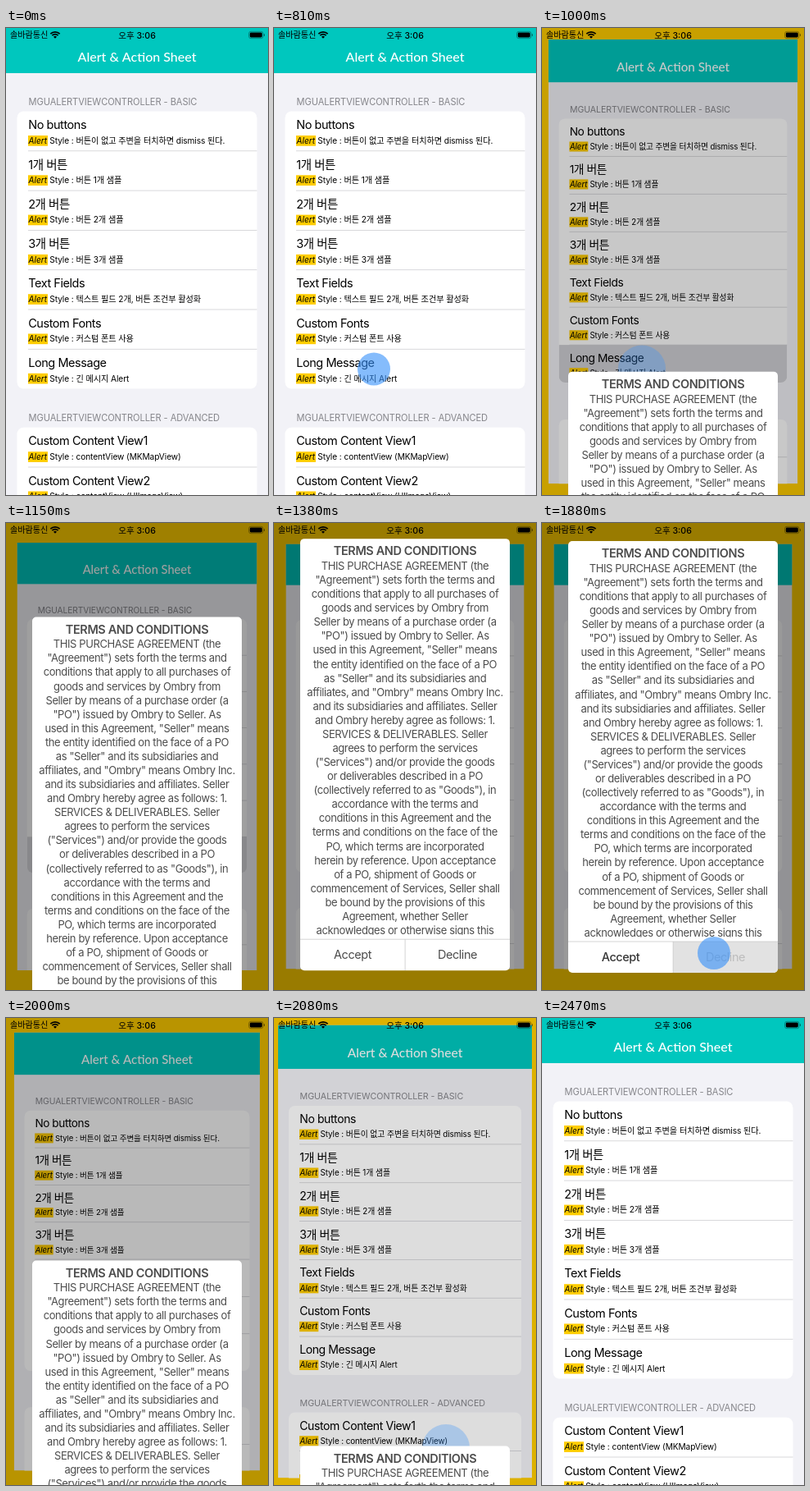
An HTML page with a canvas that plays this animation: 320x569 px, repeating every 2.52 s.

```html
<!DOCTYPE html>
<html lang="ko">
<head>
<meta charset="utf-8">
<style>
html, body { margin: 0; width: 100%; height: 100%; overflow: hidden; background: #fc0; }
canvas { display: block; width: 320px; height: 569px; }
</style>
</head>
<body>
<canvas id="stage"></canvas>
<script>
const W = 320, H = 569, LOOP = 2520;
const canvas = document.getElementById('stage');
const ctx = canvas.getContext('2d');
const ratio = window.devicePixelRatio || 1;
canvas.width = W * ratio;
canvas.height = H * ratio;

const SANS = 'Inter, "Noto Sans CJK KR", "Noto Sans CJK", sans-serif';
const TEAL = '#00c7be', YELLOW = '#fc0', INK = '#4c4c4c';
const ROW = 48.3, MODAL_TOP = 22, MODAL_HEIGHT = 526;

const BASIC = [
  ['No buttons', '버튼이 없고 주변을 터치하면 dismiss 된다.'],
  ['1개 버튼', '버튼 1개 샘플'],
  ['2개 버튼', '버튼 2개 샘플'],
  ['3개 버튼', '버튼 3개 샘플'],
  ['Text Fields', '텍스트 필드 2개, 버튼 조건부 활성화'],
  ['Custom Fonts', '커스텀 폰트 사용'],
  ['Long Message', '긴 메시지 Alert']
];
const ADVANCED = [
  ['Custom Content View1', 'contentView (MKMapView)'],
  ['Custom Content View2', 'contentView (UIImageView)']
];
const TERMS = `THIS PURCHASE AGREEMENT (the
"Agreement") sets forth the terms and
conditions that apply to all purchases of
goods and services by Ombry from
Seller by means of a purchase order (a
"PO") issued by Ombry to Seller. As
used in this Agreement, "Seller" means
the entity identified on the face of a PO
as "Seller" and its subsidiaries and
affiliates, and "Ombry" means Ombry Inc.
and its subsidiaries and affiliates. Seller
and Ombry hereby agree as follows: 1.
SERVICES & DELIVERABLES. Seller
agrees to perform the services
("Services") and/or provide the goods
or deliverables described in a PO
(collectively referred to as "Goods"), in
accordance with the terms and
conditions in this Agreement and the
terms and conditions on the face of the
PO, which terms are incorporated
herein by reference. Upon acceptance
of a PO, shipment of Goods or
commencement of Services, Seller shall
be bound by the provisions of this
Agreement, whether Seller
acknowledges or otherwise signs this`.split('\n');

const progress = (t, start, length) => Math.min(1, Math.max(0, (t - start) / length));
const easeOut = u => 1 - (1 - u) ** 3;

function spring(seconds, omega = 11.5, zeta = 0.85) {
  if (seconds <= 0) return 0;
  const root = Math.sqrt(1 - zeta * zeta), phase = omega * root * seconds;
  return 1 - Math.exp(-zeta * omega * seconds) * (Math.cos(phase) + zeta / root * Math.sin(phase));
}

function text(str, x, y, font, color, spacing = 0, align = 'left') {
  ctx.font = font;
  ctx.letterSpacing = spacing + 'px';
  ctx.fillStyle = color;
  ctx.textAlign = align;
  ctx.fillText(str, x, y);
}

function rect(x, y, w, h, color) {
  ctx.fillStyle = color;
  ctx.fillRect(x, y, w, h);
}

function roundRect(x, y, w, h, r, color) {
  ctx.beginPath();
  ctx.roundRect(x, y, w, h, r);
  ctx.fillStyle = color;
  ctx.fill();
}

function drawCard(label, rows, top, highlight) {
  const height = rows.length * ROW + (rows === ADVANCED ? 20 : 0);
  text(label, 27.5, top - 8, `11.1px ${SANS}`, '#85858a', -0.07);
  ctx.save();
  roundRect(13.5, top, 293, height, 8, '#fff');
  ctx.clip();
  rows.forEach(([title, detail], i) => {
    const y = top + i * ROW;
    if (i === 6 && highlight > 0) rect(13.5, y, 293, ROW, `rgba(209,209,214,${highlight})`);
    if (i) rect(27, y - 0.4, 280, 0.8, '#cfcfd3');
    text(title, 27.2, y + 21.7, `14.5px ${SANS}`, '#000', -0.45);
    rect(27, y + 29.5, 24, 12.7, YELLOW);
    text('Alert', 27.5, y + 39.3, `italic 10.2px ${SANS}`, '#000', -0.05);
    text('Style : ' + detail, 53.3, y + 39.3, `10.2px ${SANS}`, '#000', -0.1);
  });
  ctx.restore();
}

function drawPage(scale, highlight) {
  ctx.save();
  ctx.translate(W / 2, H / 2);
  ctx.scale(scale, scale);
  ctx.translate(-W / 2, -H / 2);
  ctx.beginPath();
  ctx.rect(0, 0, W, H);
  ctx.clip();
  rect(0, 0, W, H, '#f2f2f7');
  rect(0, 0, W, 55, TEAL);
  text('Alert & Action Sheet', W / 2, 41, '500 16px Lato, sans-serif', '#fff', 0, 'center');
  drawCard('MGUALERTVIEWCONTROLLER - BASIC', BASIC, 101.5, highlight);
  drawCard('MGUALERTVIEWCONTROLLER - ADVANCED', ADVANCED, 486.7, 0);
  ctx.restore();
}

function drawModal(top, pressed) {
  ctx.save();
  ctx.translate(0, top);
  roundRect(32, 0, 256, MODAL_HEIGHT, 5, '#fff');
  ctx.clip();
  text('TERMS AND CONDITIONS', 160, 20.2, `600 14.5px ${SANS}`, INK, -0.4, 'center');

  ctx.save();
  ctx.beginPath();
  ctx.rect(32, 0, 256, 482.5);
  ctx.clip();
  TERMS.forEach((line, i) =>
    text(line, 160, 37.8 + i * 17.08, `13px ${SANS}`, INK, -0.4, 'center'));
  ctx.restore();

  if (pressed) rect(160, 488, 128, 38, '#e2e2e2');
  rect(32, 487.6, 256, 0.8, '#c9c9c9');
  rect(159.7, 488, 0.8, 38, '#c9c9c9');
  const weight = pressed ? 500 : 400;
  text('Accept', 96, 512.2, `${weight} 14.5px ${SANS}`, pressed ? '#363636' : INK, -0.45, 'center');
  text('Decline', 224, 512.2, `14.5px ${SANS}`, pressed ? '#bcbcbc' : INK, -0.45, 'center');
  ctx.restore();
}

function drawTouch(x, y, fade) {
  if (fade >= 1) return;
  ctx.beginPath();
  ctx.arc(x, y, 20 + 18 * fade, 0, Math.PI * 2);
  ctx.fillStyle = `rgba(52,144,250,${0.6 * (1 - fade)})`;
  ctx.fill();
}

function drawStatusBar() {
  text('솔바람통신', 5, 12.3, `10.2px ${SANS}`, '#000', -0.1);
  text('오후 3:06', 160, 12.5, `500 10.6px ${SANS}`, '#000', 0, 'center');

  ctx.strokeStyle = '#000';
  ctx.lineWidth = 1.7;
  for (const r of [8, 5.1]) {
    ctx.beginPath();
    ctx.arc(60, 12.8, r, -Math.PI * 0.75, -Math.PI * 0.25);
    ctx.stroke();
  }
  ctx.beginPath();
  ctx.moveTo(60, 12.8);
  ctx.arc(60, 12.8, 2.8, -Math.PI * 0.75, -Math.PI * 0.25);
  ctx.fillStyle = '#000';
  ctx.fill();

  ctx.beginPath();
  ctx.roundRect(296.6, 4.3, 17.4, 8.4, 2.4);
  ctx.strokeStyle = 'rgba(0,0,0,.4)';
  ctx.lineWidth = 0.8;
  ctx.stroke();
  roundRect(297.8, 5.5, 15, 6, 1.4, '#000');
  roundRect(314.9, 7, 1.1, 3, 0.6, 'rgba(0,0,0,.45)');
}

function draw(t) {
  ctx.setTransform(ratio, 0, 0, ratio, 0, 0);
  const closing = t >= 1950;
  const shown = closing
    ? 1 - easeOut(progress(t, 1950, 430))
    : easeOut(progress(t, 910, 400));
  const slide = closing
    ? 1 - easeOut(progress(t, 1950, 260))
    : spring((t - 910) / 1000);
  const modalTop = MODAL_TOP + H * (1 - slide);
  const highlight = t < 890 ? 0 : 1 - progress(t, 1100, 250);

  rect(0, 0, W, H, YELLOW);
  drawPage(1 - 0.09 * shown, highlight);
  rect(0, 0, W, H, `rgba(0,0,0,${0.4 * shown})`);

  if (t >= 810 && t < 1880) drawTouch(122, 415.5, progress(t, 880, 240));
  if (closing) drawTouch(210, 524, progress(t, 1960, 240));
  if (modalTop < H) drawModal(modalTop, t >= 1880);
  if (t >= 1880 && !closing) drawTouch(210, 524, 0);
  drawStatusBar();
}

const begin = performance.now();
function frame() {
  draw((performance.now() - begin) % LOOP);
  requestAnimationFrame(frame);
}
frame();
</script>
</body>
</html>
```
